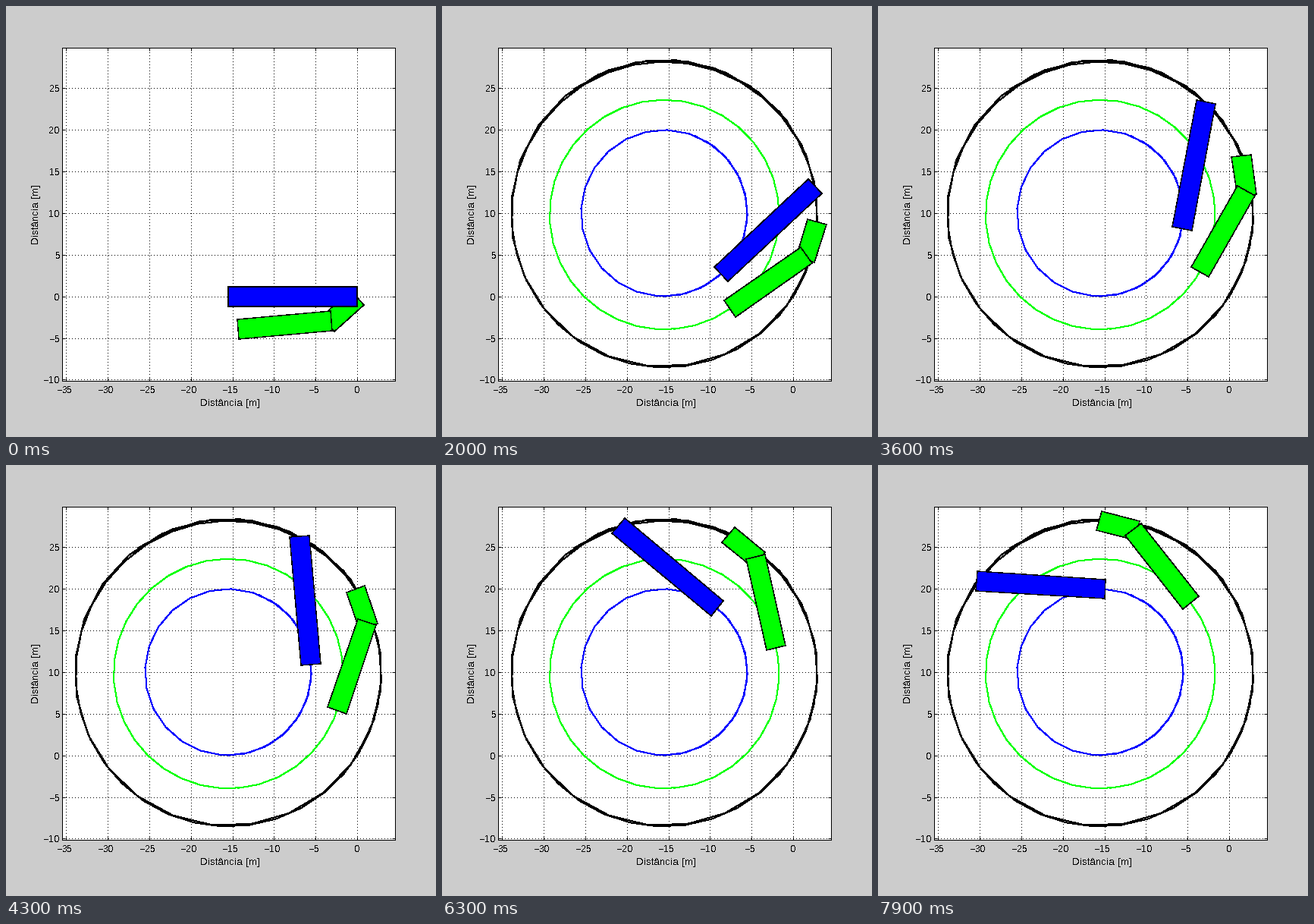
Recreate the animation shown at these times as a matplotlib script. Size 567x568 px, loop 8 s.

```python
import numpy as np
import matplotlib.pyplot as plt
from matplotlib.animation import FuncAnimation
from matplotlib.patches import Polygon

W, H, DPI = 567, 568, 64
PX = 72 / DPI                      # one pixel in points
HAIR = 0.4 * PX                    # thinnest line without antialiasing
SCALE = 10.97                      # pixels per metre
X0, Y0 = 463.05, 382.7             # pixel position of the data origin
LEFT, RIGHT, TOP, BOTTOM = 74, 513, 55, 494
FRAMES, INTERVAL = 80, 100

WIDTH = 2.37
BUS_LEN, BUS_RADIUS, BUS_RATE = 15.5, 10.0, 2.263
BUS_CENTER = np.array([-15.5, 10.0])
TRAILER_LEN, TRAILER_RADIUS = 11.22, 13.8
TRAILER_START, TRAILER_RATE = 4.9, 1.58
TRAILER_CENTER = np.array([-15.48, 9.82])
CAB_ANGLE, CAB_FRONT, CAB_BACK = 37.8, 4.21, 0.55
TRACK_STEP, TRACK_POINTS = 6.55, 36

plt.rcParams.update({
    "font.family": "Liberation Sans",
    "text.antialiased": False,
    "text.hinting_factor": 1,
})


def heading(deg):
    a = np.radians(deg)
    return np.array([np.cos(a), np.sin(a)])


def orbit(center, radius, deg):
    """Point on a circle whose tangent direction is deg."""
    return center + radius * heading(deg - 90)


def box(rear, front):
    along = (front - rear) / np.hypot(*(front - rear))
    side = WIDTH / 2 * np.array([-along[1], along[0]])
    return np.array([rear + side, front + side, front - side, rear - side])


def pose(step):
    """Rear and front points of bus, trailer and cab."""
    a = BUS_RATE * step
    bus = orbit(BUS_CENTER, BUS_RADIUS, a)
    b = TRAILER_START + TRAILER_RATE * step
    trailer = orbit(TRAILER_CENTER, TRAILER_RADIUS, b)
    hitch = trailer + TRAILER_LEN * heading(b)
    ahead = heading(b + CAB_ANGLE)
    return ((bus, bus + BUS_LEN * heading(a)),
            (trailer, hitch),
            (hitch - CAB_BACK * ahead, hitch + CAB_FRONT * ahead))


fig = plt.figure(figsize=(W / DPI, H / DPI), dpi=DPI, facecolor="0.8")
ax = fig.add_axes([LEFT / W, 1 - BOTTOM / H, (RIGHT - LEFT) / W, (BOTTOM - TOP) / H])
ax.set_xlim((LEFT - X0) / SCALE, (RIGHT - X0) / SCALE)
ax.set_ylim((Y0 - BOTTOM) / SCALE, (Y0 - TOP) / SCALE)
ax.set_axisbelow(True)
xticks, yticks = range(-35, 1, 5), range(-10, 26, 5)
ax.set_xticks(xticks)
ax.set_yticks(yticks)
ax.tick_params(direction="in", length=4 * PX, width=PX, top=True, right=True,
               labelbottom=False, labelleft=False)
# The half-pixel dash offset puts every dot on a whole pixel
ax.grid(color="k", linewidth=PX, linestyle=(3.5, (1, 3)))
for spine in ax.spines.values():
    spine.set_linewidth(PX)


def label(x, y, text, size=12, **kw):
    kw = {"ha": "center", "va": "center_baseline", **kw}
    fig.text(x / W, 1 - y / H, text, fontsize=size * PX, **kw)


def number(v):
    return str(v).replace("-", "\u2212")


for v in xticks:
    label(X0 + v * SCALE - (3 if v < 0 else 0), 506, number(v))
for v in yticks:
    label(70.5, Y0 - v * SCALE + 0.5, number(v), ha="right")
label(295, 522.5, "Distância [m]", 13)
label(40.5, 274.5, "Distância [m]", 13, rotation=90, va="center")

# Full paths of the rear and front points
samples = [pose(i * TRACK_STEP) for i in range(TRACK_POINTS)]


def track(part, end, color):
    pts = np.array([s[part][end] for s in samples])
    return ax.plot(*pts.T, color=color, linewidth=PX,
                   antialiased=False, zorder=3)[0]


tracks = [track(0, 0, "#0000ff"), track(1, 0, "#00ff00"),
          track(0, 1, "k"), track(2, 1, "k")]


def body(color, z):
    return ax.add_patch(Polygon(np.zeros((4, 2)), facecolor=color, edgecolor="k",
                                linewidth=HAIR, antialiased=False, snap=True,
                                zorder=z))


bodies = [body("#0000ff", 6), body("#00ff00", 5), body("#00ff00", 4)]


def update(n):
    for line in tracks:
        line.set_visible(n > 0)
    for patch, ends in zip(bodies, pose(max(n - 1, 0))):
        patch.set_xy(box(*ends))
    return tracks + bodies


anim = FuncAnimation(fig, update, frames=FRAMES, interval=INTERVAL,
                     repeat=True, repeat_delay=0, blit=False)
plt.show()
```
